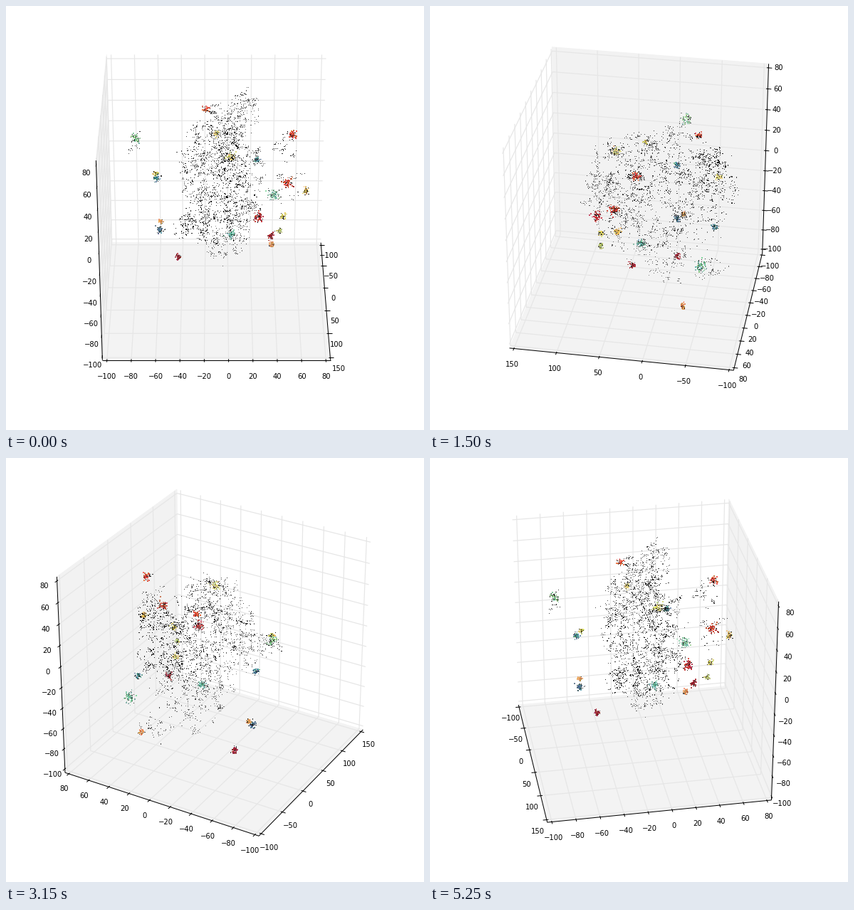
Write a matplotlib script that moves like this. It is 587 px wide and 596 px high and loops after 5.4 s.

```python
import numpy as np
import matplotlib.pyplot as plt
from matplotlib.animation import FuncAnimation
from matplotlib.collections import LineCollection
from matplotlib.colors import to_rgb

W, H, DPI = 587, 596, 72
FRAMES, STEP_MS = 36, 150
CX, CY, SCALE, DIST = 295.5, 279, 3016, 10
ELEV = np.radians(30)

EDGE = 0.5 + 1 / 48          # half size of the padded box
LABEL = EDGE + 0.5 / 12      # label distance from the centre
LIMITS = [(-100, 150, 50), (-100, 80, 20), (-100, 80, 20)]
PANES = ["#ffffff", "#f2f2f2", "#f3f3f3"]
FLIP = [1, 0, 0]             # direction in which each axis leaves its pane

# x, y, z, radius in pixels, colour
CLUSTERS = [
    (-.261, -.050, .362, 5, "#e2593a"), (-.365, .000, .182, 4.5, "#ddd07c"),
    (-.157, -.378, .268, 7, "#8cc192"), (-.041, .350, .348, 7, "#d64a3a"),
    (.105, .065, .306, 7, "#dcd480"), (-.377, .195, .031, 5, "#4a8c90"),
    (-.128, -.281, .068, 5, "#468692"), (.026, -.279, .178, 4, "#d0c660"),
    (.061, .324, .150, 7, "#d04034"), (-.327, .274, -.133, 8.5, "#74b898"),
    (.032, .415, .092, 5.5, "#dcb45c"), (.171, .195, .029, 7, "#c43436"),
    (.126, .305, .009, 4.5, "#dccc60"), (-.163, -.264, -.188, 4, "#e29c54"),
    (-.137, -.268, -.218, 5.5, "#406c7e"), (-.015, .070, -.170, 6.5, "#68ae9c"),
    (-.007, .258, -.175, 5, "#a82832"), (.134, .290, -.066, 4.5, "#b4c470"),
    (-.246, .268, -.366, 4.5, "#e48a48"), (-.150, -.184, -.375, 5, "#a02430"),
]

# x, y, z, spread, count of the denser dark patches
CLUMPS = [
    (-.35, .12, .33, .045, 150), (-.38, .06, .20, .05, 130),
    (.18, -.11, .01, .045, 150), (-.13, .05, -.29, .045, 80),
    (-.36, .14, -.24, .03, 45), (.105, .065, .306, .035, 70),
    (-.06, .31, .26, .03, 50), (.06, .34, .12, .035, 50),
    (-.157, -.36, .26, .025, 14),
]


def make_points():
    rng = np.random.default_rng(11)
    mid, radii = np.array([-.09, .03, .07]), np.array([.35, .21, .38])

    def directions(n):
        d = rng.normal(size=(n, 3))
        return d / np.linalg.norm(d, axis=1, keepdims=True)

    def inside(n, inner):
        return mid + radii * directions(n) * rng.uniform(inner, 1, (n, 1)) ** 0.6

    def streaks(centres, most):
        """Short thin strands of points around each centre."""
        parts = []
        for c, d in zip(centres, directions(len(centres))):
            n = rng.integers(2, most)
            parts.append(c + d * rng.normal(0, .016, (n, 1)) + rng.normal(0, .005, (n, 3)))
        return np.vstack(parts)

    dark = [inside(420, .1), streaks(inside(210, .25), 14)]
    for x, y, z, s, n in CLUMPS:
        spread = np.clip(rng.normal(0, s, (n // 4, 3)), -1.5 * s, 1.5 * s)
        dark.append(streaks((x, y, z) + spread, 7))
    dark = np.vstack(dark)

    pos, rgb, size = [dark], [np.zeros_like(dark)], [np.full(len(dark), 1.2)]
    for x, y, z, r, color in CLUSTERS:
        n = int(r * 9)
        pos.append((x, y, z) + rng.normal(0, r * .0015, (n, 3)))
        ink = rng.random((n, 1)) < .33
        tint = np.clip(to_rgb(color) + rng.normal(0, .06, (n, 3)), 0, 1)
        rgb.append(np.where(ink, .08, tint))
        size.append(np.where(ink[:, 0], 1.4, 3.0))
    return np.vstack(pos), np.vstack(rgb), np.concatenate(size)


POS, RGB, SIZE = make_points()


def project(p, azim):
    """Return pixel positions and depth for points in the unit box."""
    x, y, z = np.moveaxis(np.asarray(p, float), -1, 0)
    t = x * np.cos(azim) + y * np.sin(azim)
    right = y * np.cos(azim) - x * np.sin(azim)
    up = z * np.cos(ELEV) - t * np.sin(ELEV)
    depth = DIST - t * np.cos(ELEV) - z * np.sin(ELEV)
    xy = np.stack([CX + SCALE * right / depth, CY - SCALE * up / depth], -1)
    return xy, depth


def moved(p, i, value):
    q = np.array(p, float)
    q[i] = value
    return q


def draw_panes(corner, azim):
    for i in range(3):
        j, k = [a for a in range(3) if a != i]
        quad = []
        for sj, sk in [(1, 1), (1, -1), (-1, -1), (-1, 1)]:
            p = corner.copy()
            p[j] *= sj
            p[k] *= sk
            quad.append(p)
        ax.fill(*project(quad, azim)[0].T, fc=PANES[i], ec=PANES[i], lw=1, zorder=1)


def draw_axis(i, corner, azim):
    lo, hi, step = LIMITS[i]
    out = FLIP[i]
    edge = corner.copy()
    edge[out] *= -1
    side = np.sign(edge[out])
    j, k = (i + 1) % 3, (i + 2) % 3
    grid, black = [], [[moved(edge, i, s) for s in (-EDGE, EDGE)]]

    for val in range(lo, hi + 1, step):
        at = (val - lo) / (hi - lo) - 0.5
        base = moved(corner, i, at)
        grid.append([moved(base, j, -base[j]), base, moved(base, k, -base[k])])

        tick = np.array([moved(edge, i, at)] * 2)
        tick[:, out] += side * np.array([.2, -.1]) / 12
        black.append(list(tick))

        spot = moved(np.sign(edge) * LABEL, i, at)
        x, y = project(spot, azim)[0]
        ax.text(x, y, str(val).replace("-", "\u2212"), ha="center", va="top",
                fontsize=10, family="DejaVu Sans", color="black", zorder=4)

    for lines, color, lw, z in [(grid, "#e6e6e6", 1.2, 2), (black, "black", 1, 3)]:
        ax.add_collection(LineCollection(project(lines, azim)[0], colors=color,
                                         linewidths=lw, zorder=z), autolim=False)


def draw_points(azim):
    xy, depth = project(POS, azim)
    fade = 1 - .7 * (depth - depth.min()) / np.ptp(depth)
    fade = np.where(SIZE > 1.2, .5 + .5 * fade, fade)
    order = np.argsort(-depth)
    ax.scatter(*xy[order].T, s=SIZE[order], c=np.column_stack([RGB, fade])[order],
               marker="s", linewidths=0, zorder=5)


def draw(frame):
    azim = np.radians(frame * 360 / FRAMES)
    toward = np.round([np.cos(azim), np.sin(azim), np.sin(ELEV)], 9)
    corner = np.where(toward < 0, EDGE, -EDGE)
    ax.clear()
    ax.axis("off")
    draw_panes(corner, azim)
    for i in range(3):
        draw_axis(i, corner, azim)
    draw_points(azim)
    ax.set_xlim(0, W)
    ax.set_ylim(H, 0)
    return []


fig = plt.figure(figsize=((W + .01) / DPI, (H + .01) / DPI), dpi=DPI, facecolor="white")
ax = fig.add_axes([0, 0, 1, 1])
anim = FuncAnimation(fig, draw, frames=FRAMES, init_func=lambda: draw(0),
                     interval=STEP_MS, repeat=True, repeat_delay=0, blit=False)
plt.show()
```
